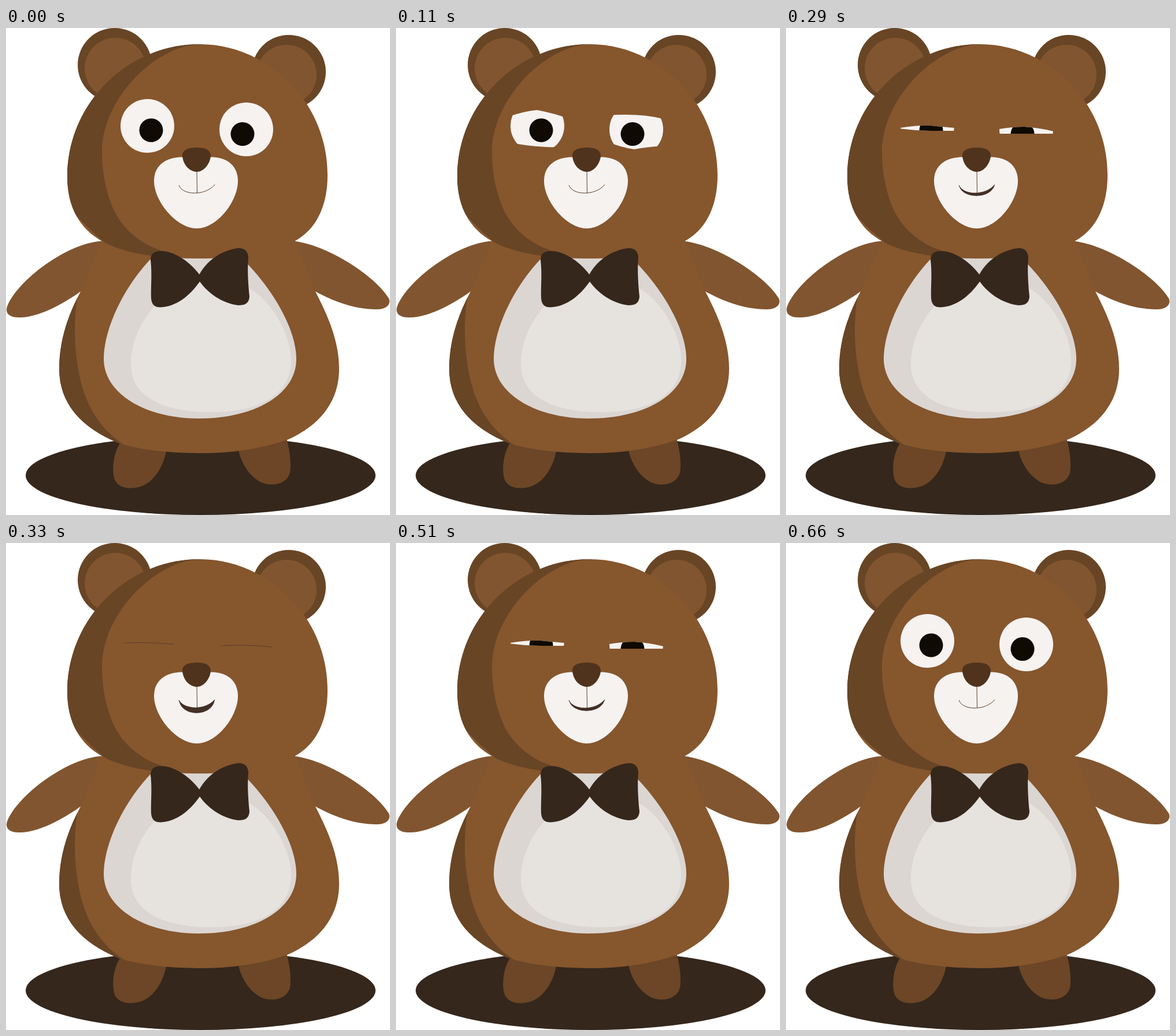
Animation of 664x843 px, one loop 770 ms. Source, as an HTML page:

```html
<!DOCTYPE html>
<html lang="en">
<head>
<meta charset="utf-8">
<title>Blinking bear</title>
<style>
html, body { margin: 0; width: 100%; height: 100%; overflow: hidden; background: #fff; }
svg { display: block; width: 664px; height: 843px; }
.coat { fill: #86562d; }
.shade { fill: #684525; }
.limb { fill: #81552f; }
.foot { fill: #6c4626; }
.dark { fill: #35271c; }
.white { fill: #f5f2f0; }
.pupil { fill: #0f0a03; }
.line { fill: none; stroke: #5b4029; stroke-width: 1; }
</style>
</head>
<body>
<svg viewBox="0 0 664 843">
  <defs>
    <path id="headShape" d="M335 28C450 28 556 125 556 255C556 310 535 350 499 369C450 392 400 399 330 399C265 399 205 391 166 369C128 348 106 310 106 258C106 130 210 28 335 28Z"/>
    <path id="bodyShape" d="M166 366L129 456C108 495 92 540 92 590C92 650 130 692 196 719C235 731 285 736 335 736C390 736 440 729 486 713C550 685 576 640 576 590C576 540 555 495 535 456L499 366Z"/>
    <clipPath id="inHead"><use href="#headShape"/></clipPath>
    <clipPath id="inBody"><use href="#bodyShape"/></clipPath>
    <clipPath id="lids"><path id="lidShape"/></clipPath>
  </defs>

  <ellipse class="dark" cx="336.5" cy="774.5" rx="302.5" ry="68.5"/>

  <g class="foot">
    <path d="M210 700L197 719C186 735 182 765 188 782C194 797 215 799 232 794C256 786 272 760 277 732V700Z"/>
    <path d="M402 700V730C406 752 420 775 440 786C460 795 485 790 491 770C494 752 490 728 485 710Z"/>
  </g>

  <g class="limb">
    <path d="M180 368L166 369C108 371 20 436 2 482C-2 494 6 501 22 501C60 502 110 470 129 456L150 450Z"/>
    <path d="M485 366L499 369C560 377 640 431 662 468C667 480 655 488 640 487C600 487 560 470 535 456L515 450Z"/>
  </g>

  <use class="coat" href="#bodyShape"/>
  <path class="shade" clip-path="url(#inBody)" d="M123 468C117 510 118 550 124 585C132 640 155 690 205 722L150 740L80 640V470Z"/>

  <path fill="#dbd6d2" d="M254 396C205 445 169 520 169 573C169 632 240 676 333 676C432 676 502 633 502 573C502 520 458 446 405 396Z"/>
  <path fill="#e6e2de" d="M258 480C232 508 216 545 216 582C216 640 275 665 355 665C440 665 493 635 493 575C493 535 465 480 425 453C380 425 300 430 258 480Z"/>

  <circle class="shade" cx="188" cy="64" r="64"/>
  <circle class="limb" cx="189" cy="70" r="53"/>
  <circle class="shade" cx="489" cy="76" r="64"/>
  <circle class="limb" cx="485" cy="81" r="52"/>

  <use class="coat" href="#headShape"/>
  <path class="shade" clip-path="url(#inHead)" d="M338 28C262 28 166 120 166 215C166 250 172 280 184 310C200 348 235 375 268 385L260 398C228 395 196 388 173 373C152 356 136 340 122 325L100 300V20Z"/>

  <path class="dark" d="M339 433C320 404 290 386 268 386C255 386 250 392 250 402C253 425 250 450 251 468C252 480 258 485 272 483C298 480 321 461 339 433Z"/>
  <path class="dark" d="M331 433C346 401 375 384 402 381C414 381 419 388 419 398C417 420 419 445 421 465C420 477 413 480 402 480C375 477 347 459 331 433Z"/>

  <path class="white" d="M330 228C305 218 256 222 256 265C256 300 295 347 330 347C365 347 401 300 401 265C401 222 355 218 330 228Z"/>
  <path class="line" d="M330 248L330.5 285"/>
  <path class="line" d="M299 272C305 290 345 291 361 271"/>
  <path id="grin" fill="#442f26"/>
  <path fill="#4f331c" d="M330 207C345 207 354 211 354 222C352 238 340 249 330 249C320 249 307 240 305 222C304 211 315 207 330 207Z"/>

  <g id="eyes" clip-path="url(#lids)">
    <circle class="white" cx="244.5" cy="169.5" r="46.5"/>
    <circle class="white" cx="415.5" cy="175.5" r="46.5"/>
    <circle class="pupil" cx="251" cy="177" r="20.5"/>
    <circle class="pupil" cx="409" cy="183.5" r="20.5"/>
  </g>
  <path id="seam" class="line" d="M204 173Q240 171 290 175M371 178Q410 175 461 180"/>
</svg>
<script>
const STEP = 110;
const SEQUENCE = [0, 1, 2, 3, 2, 1, 0];

// Eye openings and grin for each stage of the blink.
const STAGES = [
  { lids: "M190 110H480V235H190Z", grin: "" },
  {
    lids: "M196 153Q222 144 244 142Q270 147 294 155V206Q245 208 196 198Z" +
          "M366 151Q425 147 465 158V204Q430 206 412 210Q390 207 366 197Z",
    grin: ""
  },
  {
    lids: "M197 173Q228 168 250 169L292 173V178L250 178Q220 177 197 174Z" +
          "M368 175Q392 171 412 171Q440 173 463 179V183H368Z",
    grin: "M299 272C304 297 355 297 361 271C345 291 308 290 299 272Z"
  },
  { lids: "", grin: "M299 272C303 302 357 302 361 271C345 289 310 289 299 272Z" }
];

const el = id => document.getElementById(id);
const show = (id, on) => el(id).setAttribute("visibility", on ? "visible" : "hidden");

function draw(ms) {
  const { lids, grin } = STAGES[SEQUENCE[Math.floor(ms / STEP) % SEQUENCE.length]];
  el("lidShape").setAttribute("d", lids);
  el("grin").setAttribute("d", grin);
  show("eyes", lids);
  show("seam", !lids);
}

const start = performance.now();
function tick() {
  draw(performance.now() - start);
  requestAnimationFrame(tick);
}
tick();
</script>
</body>
</html>
```
